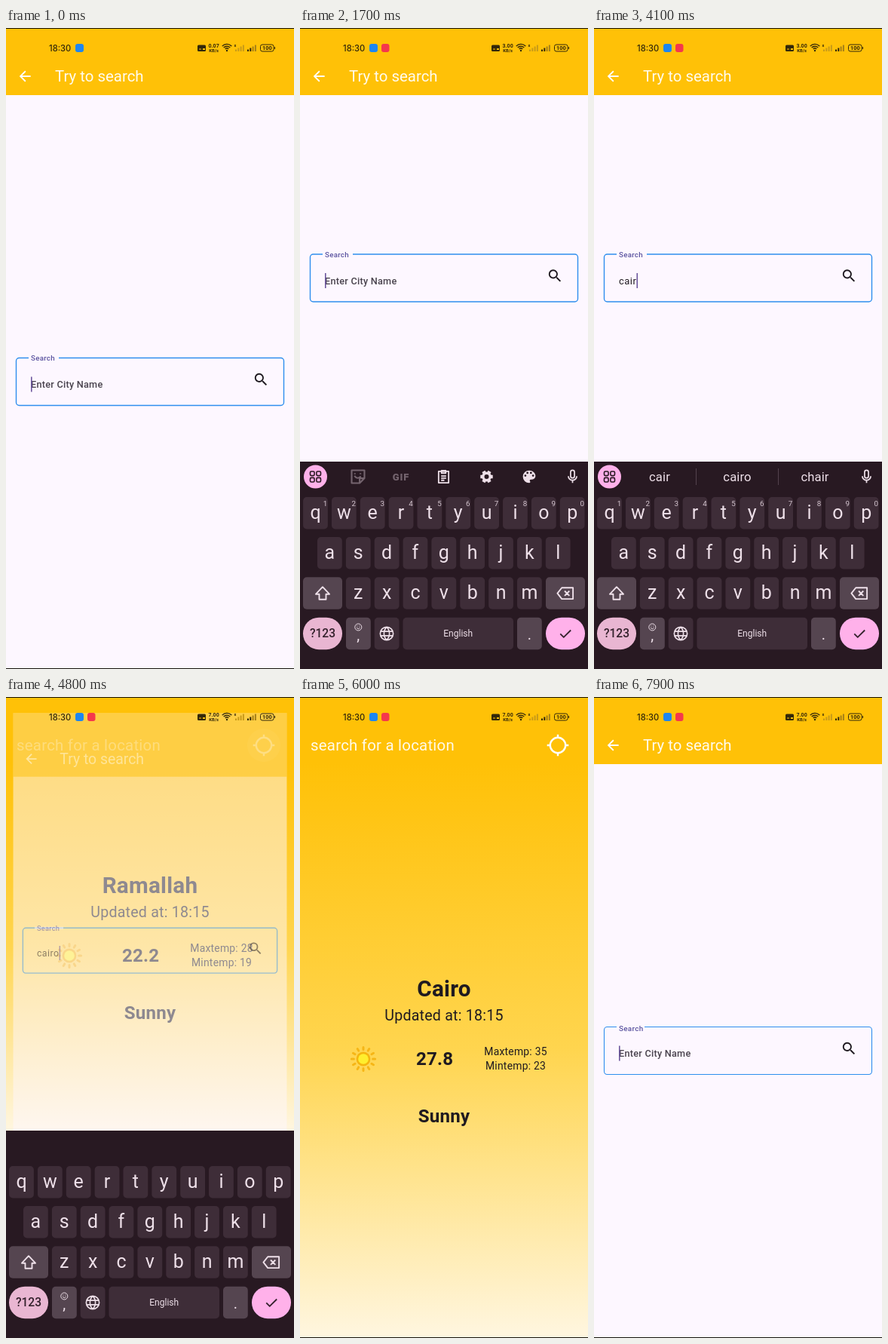
Animation, 382 px wide and 850 px high, one loop 8000 ms. Source, as an HTML page with a canvas:

```html
<!DOCTYPE html>
<html lang="en">
<head>
<meta charset="utf-8">
<title>Weather search</title>
<style>
html, body { margin: 0; width: 100%; height: 100%; overflow: hidden; background: #fdf7ff; }
canvas { display: block; width: 382px; height: 850px; }
</style>
</head>
<body>
<canvas id="stage"></canvas>
<script>
const W = 382, H = 850, LOOP = 8000, STEP = 100;
const DP = 0.9286, KB_H = 275, FIELD_SHIFT = 137;
const AMBER = '#ffc107', PAGE = '#fdf7ff', BLUE = '#2f8fee', INK = '#1f1a20';
const KB = '#281922', KEY = '#3e2d38', KEY_ALT = '#554550', PINK = '#ffb1ea', KEY_INK = '#eee0e9';

const canvas = document.getElementById('stage');
const ctx = canvas.getContext('2d');
const dpr = window.devicePixelRatio || 1;
canvas.width = W * dpr;
canvas.height = H * dpr;

const clamp = v => Math.min(1, Math.max(0, v));
const span = (t, start, length) => clamp((t - start) / length);
const easeOut = (p, power = 1.4) => 1 - Math.pow(1 - p, power);
const mix = (a, b, p) => a + (b - a) * p;

function text(str, x, y, size, color, o = {}) {
  ctx.font = `${o.weight || 400} ${size}px ${o.font || 'Roboto'}, sans-serif`;
  ctx.letterSpacing = (o.gap || 0) + 'px';
  ctx.textAlign = o.align || 'left';
  ctx.fillStyle = color;
  ctx.fillText(str, x, y);
}
const centered = (str, x, y, size, color, o) => text(str, x, y, size, color, { ...o, align: 'center' });

function rect(x, y, w, h, color, r = 0) {
  ctx.fillStyle = color;
  ctx.beginPath();
  ctx.roundRect(x, y, w, h, r);
  ctx.fill();
}

function disc(x, y, r, color) {
  ctx.fillStyle = color;
  ctx.beginPath();
  ctx.arc(x, y, r, 0, 7);
  ctx.fill();
}

function ring(x, y, r, width, color) {
  ctx.strokeStyle = color;
  ctx.lineWidth = width;
  ctx.beginPath();
  ctx.arc(x, y, r, 0, 7);
  ctx.stroke();
}

// Evenly spaced radial strokes around a centre
function rays(x, y, from, to, count, width, color, cap = 'butt') {
  ctx.strokeStyle = color;
  ctx.lineWidth = width;
  ctx.lineCap = cap;
  ctx.beginPath();
  for (let i = 0; i < count; i++) {
    const a = i * 2 * Math.PI / count, c = Math.cos(a), s = Math.sin(a);
    ctx.moveTo(x + c * from, y + s * from);
    ctx.lineTo(x + c * to, y + s * to);
  }
  ctx.stroke();
  ctx.lineCap = 'butt';
}

// Icons live on a 24-unit grid; a width means outline instead of fill
function icon(d, cx, cy, scale, color, width = 0) {
  ctx.save();
  ctx.translate(cx - 12 * scale, cy - 12 * scale);
  ctx.scale(scale, scale);
  const path = new Path2D(d);
  if (width) {
    ctx.strokeStyle = color;
    ctx.lineWidth = width;
    ctx.lineJoin = 'round';
    ctx.stroke(path);
  } else {
    ctx.fillStyle = color;
    ctx.fill(path, 'evenodd');
  }
  ctx.restore();
}

const hole = (x, y, r) => `M${x - r} ${y}a${r} ${r} 0 1 0 ${2 * r} 0a${r} ${r} 0 1 0 ${-2 * r} 0z`;
const ICON = {
  back: 'M20 11H7.83l5.59-5.59L12 4l-8 8 8 8 1.41-1.41L7.83 13H20z',
  search: 'M15.5 14h-.79l-.28-.27A6.5 6.5 0 1 0 13.73 14.43l.27.28v.79l5 4.99L20.49 19z' + hole(9.5, 9.5, 4.5),
  sticker: 'M4 4H20V14L14 20H4zM20 14H14V20M7.5 11q3.5 5 8 .5M8 7.5v1.5M15 7.5v1.5',
  paste: 'M5 4.5H19V20.5H5zM9 3.5H15V7H9zM8.5 11h7M8.5 14h7M8.5 17h4.5',
  palette: 'M12 3a9 9 0 0 0 0 18c1.5 0 2-1.5 1.1-2.5-.9-1 0-2.5 1.2-2.5H16a5 5 0 0 0 5-5c0-4.4-4-8-9-8z' +
    [[6.5, 10.5], [9.5, 6.5], [14.5, 6.5], [17.5, 10.5]].map(p => hole(...p, 1.5)).join(''),
  mic: 'M9 5a3 3 0 0 1 6 0v6a3 3 0 0 1-6 0zM5.5 11a6.5 6.5 0 0 0 13 0M12 17.5V21.5',
  shift: 'M12 3.5L21 13H16.5V20H7.5V13H3z',
  erase: 'M8 5H22V19H8L2.5 12zM11.5 9l6 6M17.5 9l-6 6',
  globe: hole(12, 12, 9) + 'M12 3c-5 5-5 13 0 18M12 3c5 5 5 13 0 18M4 9H20M4 15H20',
  check: 'M4.5 12.5l5 5L20 7',
  smile: hole(12, 12, 9) + 'M7.5 13.5q4.5 6 9 0M9 8v2M15 8v2'
};

function statusBar(t) {
  const speed = t < 500 ? '0.07' : t < 4700 ? '3.00' : '7.00';
  const dark = '#33280a';
  text('18:30', 57, 30.7, 11.2, dark, { weight: 500, font: 'Inter' });
  rect(92, 21, 11, 11, '#1e86f0', 3);
  if (t >= 500) rect(108, 21, 10.5, 11, '#f5384c', 3);
  rect(254, 22.5, 11, 8.5, dark, 1.5);
  rect(256, 27.5, 3, 1, AMBER);
  rect(261, 27, 3, 2, AMBER);
  centered(speed, 275.6, 26, 7, dark, { weight: 700 });
  centered('KB/s', 275.6, 32, 5.8, dark, { weight: 700 });
  ctx.strokeStyle = dark;
  ctx.lineWidth = 1.4;
  for (const r of [3, 5.8, 8.6]) {
    ctx.beginPath();
    ctx.arc(293, 30, r, -Math.PI * 0.76, -Math.PI * 0.24);
    ctx.stroke();
  }
  disc(293, 30, 1.2, dark);
  text('x', 302.5, 25, 5.5, dark, { weight: 700 });
  for (let i = 0; i < 4; i++) {
    const h = 2.5 + i * 2;
    rect(304 + i * 3.3, 31 - h, 2, h, '#c79a19');
    rect(320 + i * 3.3, 31 - h, 2, h, i < 2 ? dark : '#a47f19');
  }
  ctx.strokeStyle = dark;
  ctx.lineWidth = 1;
  ctx.beginPath();
  ctx.roundRect(337.5, 22, 17.5, 9, 2.5);
  ctx.stroke();
  rect(356, 25, 1, 3, dark);
  centered('100', 346.3, 29.2, 7.4, dark, { weight: 600 });
}

function typed(t) {
  const count = [2200, 2700, 3400, 3800, 4200].filter(at => t >= at).length;
  return t < 6800 ? 'cairo'.slice(0, count) : '';
}

function field(t, lift) {
  const float = t < 7000 ? 1 : easeOut(span(t, 7800, 129), 2);
  const active = float > 0;
  const value = typed(t);
  ctx.save();
  ctx.translate(0, -lift);
  ctx.strokeStyle = BLUE;
  ctx.lineWidth = t >= 7000 ? 1.1 : 1.4;
  ctx.beginPath();
  ctx.roundRect(13.5, 437.5, 355, 63, 4);
  ctx.stroke();
  if (active) rect(30, 436, float < 1 ? 37 : 40, 3, PAGE);
  text('Search', 33, mix(474, 441.2, float), mix(13, 9.75, float),
    active ? '#5b54a0' : '#49454f', { weight: 500, gap: 0.28 });
  if (active && !value) text('Enter City Name', 33, 477.2, 12.7, '#49434d', { weight: 500, gap: 0.25 });
  text(value, 33, 477.2, 13, INK, { gap: 0.46 });
  const blink = (t >= 1400 && t < 1700) || (t >= 3100 && t < 3300);
  if (active && !blink) {
    const x = value ? 33.2 + ctx.measureText(value).width : 33;
    rect(x, 462.5, 1.6, 20, '#6c569e');
  }
  icon(ICON.search, 338.2, 466.2, DP, INK);
  ctx.restore();
}

function searchPage(t, lift) {
  rect(0, 0, W, H, PAGE);
  rect(0, 0, W, 89, AMBER);
  icon(ICON.back, 25.2, 64, DP, '#fff');
  text('Try to search', 65, 71.2, 20.43, '#fffbee');
  field(t, lift);
}

function sun(x, y) {
  rays(x, y, 12.6, 15.6, 12, 3, '#f6b616', 'round');
  disc(x, y, 9.4, '#f5b50f');
  disc(x, y, 6.8, '#ffee2e');
}

function homePage(t, inset) {
  const bottom = H - inset;
  const dy = FIELD_SHIFT * (1 - inset / KB_H);
  const city = t < 6000
    ? { name: 'Ramallah', temp: '22.2', max: 28, min: 19 }
    : { name: 'Cairo', temp: '27.8', max: 35, min: 23 };
  rect(0, 0, W, H, PAGE);
  const sky = ctx.createLinearGradient(0, 88, 0, bottom);
  sky.addColorStop(0, AMBER);
  sky.addColorStop(0.5, '#ffd54f');
  sky.addColorStop(1, '#fff6e0');
  rect(0, 0, W, bottom, sky);
  text('search for a location', 14, 71.2, 20.43, '#fffaea', { gap: 0.23 });
  if (t >= 4700 && t < 5400) disc(342, 64, 22, `rgba(255,255,255,${0.12 * (1 - span(t, 5000, 400))})`);
  ring(342, 64, 10.2, 2.4, '#fff');
  rays(342, 64, 10.5, 14.3, 4, 2.4, '#fff');

  ctx.save();
  ctx.translate(0, dy);
  const bold = { weight: 700, gap: 0.23 }, plain = { gap: 0.23 };
  centered(city.name, 191, 259.5, 29.7, INK, bold);
  centered('Updated at: 18:15', 191, 292.3, 19.6, INK, plain);
  sun(84, 343);
  centered(city.temp, 178.7, 351.2, 24.1, INK, bold);
  centered('Maxtemp: ' + city.max, 286, 337.6, 13.9, INK, plain);
  centered('Mintemp: ' + city.min, 286, 357.4, 13.9, INK, plain);
  centered('Sunny', 191, 426.8, 24.1, INK, bold);
  ctx.restore();
}

function suggestions(t) {
  if (t < 2700) return ['c', 'can', 'come'];
  if (t < 3400) return ['ca', 'can', 'call'];
  if (t < 3800) return ['cai', 'cairo', 'said'];
  if (t < 4200) return ['cair', 'cairo', 'chair'];
  return ['cairo', 'Cairo', 'chair'];
}

function toolbar(t) {
  const y = 595, dim = '#74646e';
  disc(20.5, y, 15.5, PINK);
  ctx.strokeStyle = KB;
  ctx.lineWidth = 1.6;
  for (const dx of [-7, 1.4]) for (const dy of [-7, 1.4]) {
    ctx.beginPath();
    ctx.roundRect(20.5 + dx, y + dy, 5.6, 5.6, 1.5);
    ctx.stroke();
  }
  icon(ICON.mic, 361.5, y, 0.86, KEY_INK, 2);
  if (t >= 2400) {
    suggestions(t).forEach((word, i) => centered(word, 87 + i * 103, 601, 16.7, KEY_INK, { gap: 0.1 }));
    rect(135, 584, 1, 22, '#53424d');
    rect(244, 584, 1, 22, '#53424d');
    return;
  }
  icon(ICON.sticker, 77, y, 1.06, dim, 2);
  centered('GIF', 134, 599.6, 13, dim, { weight: 900, gap: 0.8 });
  icon(ICON.paste, 190.5, y, 0.95, KEY_INK, 1.9);
  rays(247.5, y, 4, 8.2, 6, 4.6, KEY_INK);
  ring(247.5, y, 4.7, 3.4, KEY_INK);
  icon(ICON.palette, 304, y, 0.93, KEY_INK);
}

const PITCH = 37.85;

function letterRow(letters, x, y, hints) {
  [...letters].forEach((ch, i) => {
    const cx = x + i * PITCH;
    rect(cx - 16.4, y, 32.8, 42.5, KEY, 5);
    centered(ch, cx, y + 28.7, 25, KEY_INK);
    if (hints) centered(String((i + 1) % 10), cx + 13, y + 11.5, 9.8, '#d5c6d0');
  });
}

function keyboard(t, drop) {
  if (drop >= KB_H) return;
  const open = t < 4800;
  ctx.save();
  ctx.translate(0, drop);
  rect(0, 575, W, KB_H, KB);
  if (open) toolbar(t);
  letterRow('qwertyuiop', 20.5, 622, open);
  letterRow('asdfghjkl', 39.4, 675, false);
  letterRow('zxcvbnm', 77.3, 728.2, false);
  rect(4, 728.2, 52, 42.5, KEY_ALT, 5);
  rect(326, 728.2, 52, 42.5, KEY_ALT, 5);
  icon(ICON.shift, 30, 749.7, 1, KEY_INK, 1.9);
  icon(ICON.erase, 351.5, 749.7, 1.06, KEY_INK, 1.8);

  const y = 781.7;
  rect(4, y, 52, 42.5, '#e9b6d2', 21);
  centered('?123', 30, 808.3, 15.6, '#35222d', { weight: 500 });
  rect(61, y, 32.8, 42.5, KEY_ALT, 5);
  icon(ICON.smile, 77.3, 794.5, 0.5, KEY_INK, 2);
  centered(',', 77.3, 812, 20, KEY_INK);
  rect(98.7, y, 32.8, 42.5, KEY, 5);
  icon(ICON.globe, 115, 803, 0.96, KEY_INK, 1.7);
  rect(136.5, y, 146.5, 42.5, KEY, 5);
  centered('English', 209.7, 807.2, 12, KEY_INK);
  rect(288, y, 32.8, 42.5, KEY_ALT, 5);
  centered('.', 304.4, 811, 20, KEY_INK);
  rect(326, y, 52, 42.5, PINK, 21);
  icon(ICON.check, 352, 803, 0.9, '#35222d', 2);
  ctx.restore();
}

// Slides in after focus, out after submit; 0 is fully closed
function slide(t, inAt, inFor, outAt, outFor) {
  return easeOut(span(t, inAt, inFor)) - easeOut(span(t, outAt, outFor));
}

function draw(t) {
  ctx.setTransform(dpr, 0, 0, dpr, 0, 0);
  const shown = slide(t, 750, 450, 4850, 450);
  const inset = KB_H * slide(t, 900, 300, 5000, 350);
  const page = 1 - span(t, 4700, 200) + easeOut(span(t, 6900, 300), 2);

  if (page < 1) homePage(t, inset);
  if (page > 0) {
    const scale = mix(0.9, 1, page);
    ctx.save();
    ctx.globalAlpha = page;
    ctx.translate(W / 2, H / 2);
    ctx.scale(scale, scale);
    ctx.translate(-W / 2, -H / 2);
    searchPage(t, inset / 2);
    ctx.restore();
  }
  statusBar(t);
  rect(0, 0, W, 1, '#15120a');
  rect(0, H - 1, W, 1, '#15120a');
  keyboard(t, KB_H * (1 - shown));
}

const begin = performance.now();
function tick() {
  const t = (performance.now() - begin) % LOOP;
  draw(Math.floor(t / STEP) * STEP);
  requestAnimationFrame(tick);
}
tick();
</script>
</body>
</html>
```
